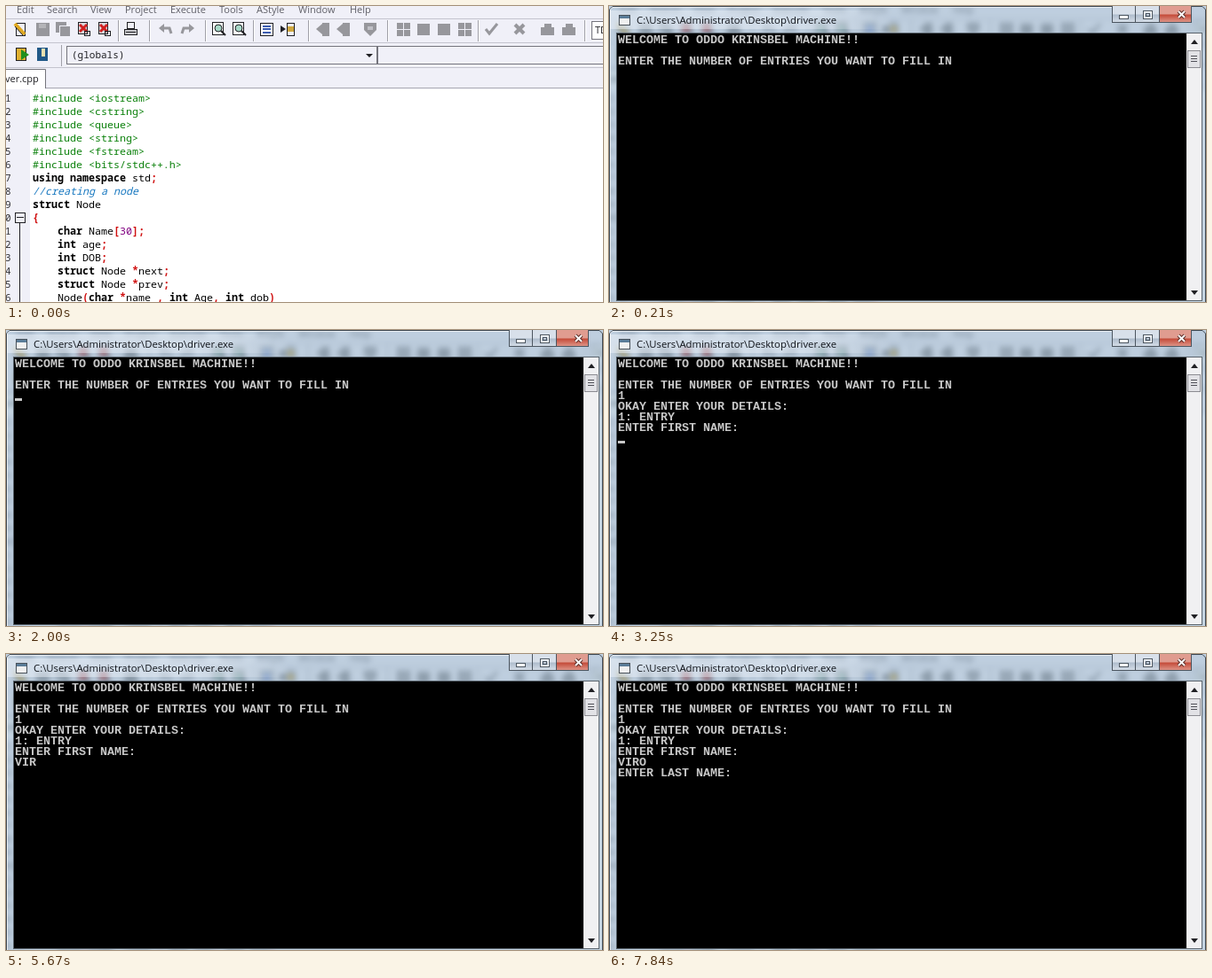
An HTML page with a canvas that plays this animation: 672 px wide and 334 px high, repeating every 8 s.

```html
<!DOCTYPE html>
<html lang="en">
<head>
<meta charset="utf-8">
<title>Console session</title>
<style>
html, body { margin: 0; width: 100%; height: 100%; overflow: hidden; }
canvas { display: block; }
</style>
</head>
<body>
<canvas id="stage" width="672" height="334"></canvas>
<script>
const W = 672, H = 334, LOOP = 8000;
const UI = '"Open Sans", sans-serif';
const CODE = '"Noto Sans Mono", monospace';
const MONO = '"Liberation Mono", monospace';
const INK = '#202024', GRAY = '#97979c', BAR = '#f0f0f8', PAPER = '#fff';
const EDGE = '#c4c4ce', BORDER = '#74747c', CONSOLE_INK = '#c8c8c8';

function makeLayer(paint) {
  const canvas = document.createElement('canvas');
  canvas.width = W;
  canvas.height = H;
  paint(canvas.getContext('2d'));
  return canvas;
}

function rect(c, color, x, y, w, h) {
  c.fillStyle = color;
  c.fillRect(x, y, w, h);
}

function frame(c, color, x, y, w, h) {
  c.strokeStyle = color;
  c.lineWidth = 1;
  c.strokeRect(x + .5, y + .5, w - 1, h - 1);
}

function line(c, color, width, ...points) {
  c.strokeStyle = color;
  c.lineWidth = width;
  c.beginPath();
  for (let i = 0; i < points.length; i += 2) c.lineTo(points[i], points[i + 1]);
  c.stroke();
}

function shape(c, color, ...points) {
  c.fillStyle = color;
  c.beginPath();
  for (let i = 0; i < points.length; i += 2) c.lineTo(points[i], points[i + 1]);
  c.fill();
}

function text(c, string, x, y, font, color) {
  c.font = font;
  c.fillStyle = color;
  c.fillText(string, x, y);
}

// Toolbar icons, each centred on x, y
const icons = {
  edit(c, x, y) {
    frame(c, INK, x - 5, y - 7, 11, 15);
    line(c, '#e0a820', 4, x - 6, y - 6, x + 5, y + 6);
    line(c, INK, 1, x - 6, y - 3, x + 3, y + 7);
  },
  save(c, x, y) {
    rect(c, GRAY, x - 7, y - 7, 15, 15);
    rect(c, '#b4b4b8', x - 4, y - 6, 8, 5);
  },
  saveAll(c, x, y) {
    rect(c, GRAY, x - 8, y - 8, 12, 12);
    rect(c, BAR, x - 4, y - 4, 12, 12);
    rect(c, GRAY, x - 3, y - 3, 11, 11);
  },
  close(c, x, y) {
    rect(c, '#d8d8dc', x - 6, y - 8, 11, 14);
    frame(c, INK, x - 6, y - 8, 11, 14);
    line(c, '#d02020', 3, x - 4, y - 5, x + 4, y + 3);
    line(c, '#d02020', 3, x + 4, y - 5, x - 4, y + 3);
    frame(c, INK, x + 1, y + 2, 7, 6);
  },
  print(c, x, y) {
    frame(c, INK, x - 4, y - 8, 9, 8);
    rect(c, '#c8c8cc', x - 7, y, 15, 7);
    frame(c, INK, x - 7, y, 15, 7);
    rect(c, INK, x - 5, y + 3, 11, 1);
  },
  undo(c, x, y, dir = 1) {
    shape(c, GRAY, x - 8 * dir, y - 1, x - 2 * dir, y - 6, x - 2 * dir, y + 4);
    line(c, GRAY, 3, x - 3 * dir, y - 1, x + 4 * dir, y - 1, x + 6 * dir, y + 5);
  },
  redo(c, x, y) { icons.undo(c, x, y, -1); },
  find(c, x, y) {
    rect(c, PAPER, x - 7, y - 8, 13, 15);
    frame(c, INK, x - 7, y - 8, 13, 15);
    c.fillStyle = '#a8d8c8';
    c.beginPath();
    c.arc(x, y - 1, 4, 0, 7);
    c.fill();
    c.stroke();
    line(c, INK, 2, x + 3, y + 2, x + 8, y + 7);
  },
  page(c, x, y) {
    rect(c, PAPER, x - 7, y - 7, 15, 15);
    frame(c, INK, x - 7, y - 7, 15, 15);
    for (const dy of [-4, -1, 3]) rect(c, '#3c5cb0', x - 4, y + dy, 9, 2);
  },
  jump(c, x, y) {
    frame(c, INK, x - 1, y - 7, 9, 15);
    rect(c, '#d0a840', x, y - 3, 7, 6);
    shape(c, INK, x - 8, y - 4, x - 2, y, x - 8, y + 4);
  },
  mark(c, x, y) {
    rect(c, GRAY, x - 1, y - 7, 8, 15);
    shape(c, GRAY, x - 8, y, x - 1, y - 6, x - 1, y + 6);
  },
  shield(c, x, y) {
    shape(c, GRAY, x - 7, y - 7, x + 7, y - 7, x + 7, y + 1, x, y + 8, x - 7, y + 1);
    rect(c, '#c0c0c6', x - 3, y - 3, 6, 4);
  },
  grid(c, x, y) {
    for (const dx of [-7, 1]) for (const dy of [-7, 1]) rect(c, GRAY, x + dx, y + dy, 7, 7);
  },
  block(c, x, y) {
    rect(c, GRAY, x - 7, y - 6, 14, 13);
  },
  check(c, x, y) { line(c, GRAY, 3, x - 6, y, x - 2, y + 5, x + 7, y - 6); },
  cross(c, x, y) {
    line(c, GRAY, 4, x - 5, y - 5, x + 5, y + 5);
    line(c, GRAY, 4, x + 5, y - 5, x - 5, y + 5);
  },
  chart(c, x, y) {
    rect(c, GRAY, x - 7, y - 2, 15, 9);
    rect(c, GRAY, x - 3, y - 6, 8, 6);
  }
};

const toolbar = [
  ['edit', 16], ['save', 41], ['saveAll', 64], ['close', 87], ['close', 110], ['print', 140],
  ['undo', 180], ['redo', 204], ['find', 239], ['find', 262], ['page', 293], ['jump', 317],
  ['mark', 357], ['mark', 380], ['shield', 410], ['grid', 447], ['block', 470],
  ['block', 493], ['grid', 516], ['check', 546], ['cross', 578], ['chart', 609], ['chart', 633]
];

const menu = { Edit: 12, Search: 46, View: 95, Project: 134, Execute: 185,
  Tools: 240, AStyle: 282, Window: 329, Help: 387 };

const code = `#include <iostream>
#include <cstring>
#include <queue>
#include <string>
#include <fstream>
#include <bits/stdc++.h>
using namespace std;
//creating a node
struct Node
{
    char Name[30];
    int age;
    int DOB;
    struct Node *next;
    struct Node *prev;
    Node(char *name , int Age, int dob)`.split('\n');

function drawCodeLine(c, source, y) {
  const size = '11.667px ' + CODE;
  if (source[0] === '#') return text(c, source, 30, y, size, '#0a800a');
  if (source[0] === '/') return text(c, source, 30, y, 'italic ' + size, '#1878c0');
  for (const token of source.matchAll(/\w+|[^\w\s]/g)) {
    const keyword = /^(using|namespace|struct|char|int)$/.test(token[0]);
    const symbol = /\W/.test(token[0]);
    const number = /^\d/.test(token[0]);
    text(c, token[0], 30 + 7 * token.index, y, (keyword || symbol ? 'bold ' : '') + size,
      symbol ? '#d01010' : number ? '#800080' : '#000');
  }
}

function drawCombo(c, x, w) {
  rect(c, BAR, x, 45, w, 21);
  frame(c, BORDER, x, 45, w, 21);
  shape(c, INK, x + w - 13, 54, x + w - 5, 54, x + w - 9, 58);
}

const editor = makeLayer(c => {
  rect(c, BAR, 0, 0, W, H);
  for (const name in menu) text(c, name, menu[name], 8, '11px ' + UI, '#606068');
  rect(c, EDGE, 0, 14, W, 1);
  rect(c, EDGE, 0, 41, W, 1);
  for (const x of [126, 161, 224, 278, 340, 429, 531, 651]) {
    rect(c, '#a0a0a8', x, 16, 1, 24);
    rect(c, PAPER, x + 1, 16, 1, 24);
  }
  for (const [name, x] of toolbar) icons[name](c, x, 26);
  rect(c, PAPER, 659, 17, 20, 21);
  frame(c, BORDER, 659, 17, 20, 21);
  text(c, 'TDM', 663, 31, '11px ' + UI, INK);

  rect(c, '#e0b030', 11, 47, 12, 15);
  frame(c, INK, 11, 47, 12, 15);
  shape(c, '#209020', 17, 49, 26, 55, 17, 61);
  rect(c, '#205888', 35, 47, 12, 15);
  rect(c, '#e8e0b0', 40, 48, 4, 9);
  rect(c, '#a0a0a8', 62, 44, 1, 24);
  drawCombo(c, 68, 350);
  drawCombo(c, 418, 300);
  text(c, '(globals)', 74, 59, '11px ' + CODE, INK);

  rect(c, EDGE, 0, 69, W, 1);
  rect(c, '#acacb4', 0, 92, W, 1);
  rect(c, PAPER, 0, 71, 44, 23);
  line(c, BORDER, 1, 0, 71.5, 44.5, 71.5, 44.5, 93);
  text(c, 'ver.cpp', -1, 86, '11px ' + UI, INK);

  rect(c, PAPER, 0, 94, W, 240);
  rect(c, BAR, 0, 94, 27, 240);
  code.forEach((source, i) => {
    const y = 108 + 15 * i;
    text(c, String((i + 1) % 10), -1, y, '11px ' + CODE, '#303034');
    drawCodeLine(c, source, y);
  });
  line(c, INK, 1, 15.5, 245, 15.5, H);
  frame(c, INK, 10, 233, 12, 12);
  rect(c, INK, 12, 238, 8, 1);
});

function drawTitleButton(c, x, w, top, bottom) {
  const fill = c.createLinearGradient(0, 0, 0, 19);
  fill.addColorStop(0, top);
  fill.addColorStop(.48, top);
  fill.addColorStop(.52, bottom);
  fill.addColorStop(1, top);
  rect(c, fill, x, 0, w, 19);
  frame(c, '#4c5660', x, -1, w, 20);
}

const consoleWindow = makeLayer(c => {
  // Glass: the blurred editor under a cool tint
  rect(c, BAR, 0, 0, W, H);
  c.filter = 'blur(3px)';
  c.drawImage(editor, 0, 0);
  c.filter = 'none';
  rect(c, 'rgba(130,165,190,.45)', 0, 0, W, H);
  const glow = c.createLinearGradient(0, 0, 320, 0);
  glow.addColorStop(0, 'rgba(245,249,255,.45)');
  glow.addColorStop(.75, 'rgba(245,249,255,.35)');
  glow.addColorStop(1, 'rgba(245,249,255,0)');
  rect(c, glow, 0, 5, 320, 21);

  line(c, '#3c4650', 1, .5, H, .5, 4, 4, .5, W - 4, .5, W - .5, 4, W - .5, H);
  line(c, 'rgba(255,255,255,.7)', 1, 1.5, H, 1.5, 4, 4, 1.5, 566, 1.5);

  rect(c, '#f0f0f0', 11, 10, 13, 12);
  frame(c, '#4a525a', 11, 10, 13, 12);
  rect(c, '#5a7c98', 12, 11, 11, 3);
  text(c, 'C:\\Users\\Administrator\\Desktop\\driver.exe', 31, 20, '11.3px ' + UI, '#10141a');

  drawTitleButton(c, 566, 27, '#d8e0ea', '#aebccc');
  drawTitleButton(c, 592, 28, '#d8e0ea', '#aebccc');
  drawTitleButton(c, 619, 37, '#e09c90', '#c44a38');
  rect(c, '#fff', 574, 11, 11, 3);
  frame(c, '#4c5660', 574, 10, 11, 5);
  frame(c, '#4c5660', 601, 5, 11, 10);
  frame(c, '#fff', 602, 6, 9, 8);
  frame(c, '#4c5660', 604, 8, 5, 4);
  for (const [color, width] of [['#60302a', 4], ['#fff', 2]]) {
    line(c, color, width, 641, 6, 648, 13);
    line(c, color, width, 648, 6, 641, 13);
  }

  frame(c, '#59636c', 8, 30, 660, 303);
  rect(c, '#000', 9, 31, 641, 301);
  rect(c, '#f0f0f2', 650, 31, 17, 301);
  shape(c, INK, 655, 43, 659, 38, 663, 43);
  shape(c, INK, 655, 321, 663, 321, 659, 326);
  rect(c, '#e2e2e6', 651, 50, 15, 20);
  frame(c, '#8c8c92', 651, 50, 15, 20);
  for (const y of [56, 59, 62]) rect(c, '#505058', 655, y, 7, 1);
});

const stage = document.getElementById('stage').getContext('2d');
const screen = makeLayer(() => {});
const intro = ['WELCOME TO ODDO KRINSBEL MACHINE!!', '',
  'ENTER THE NUMBER OF ENTRIES YOU WANT TO FILL IN'];
const typed = (t, word, times) => word.slice(0, times.filter(at => t >= at).length);

function consoleLines(t) {
  const lines = [...intro, typed(t, '1', [2330])];
  if (t >= 2670) {
    lines.push('OKAY ENTER YOUR DETAILS:', '1: ENTRY', 'ENTER FIRST NAME:',
      typed(t, 'VIRO', [4540, 5170, 5670, 6000]));
  }
  if (t >= 6170) lines.push('ENTER LAST NAME:', '');
  return lines;
}

function drawConsole(c, t) {
  c.drawImage(consoleWindow, 0, 0);
  const lines = consoleLines(t);
  lines.forEach((string, row) =>
    text(c, string, 10, 42 + 12 * row, 'bold 13.333px ' + MONO, CONSOLE_INK));
  if (t >= 1000 && t % 1000 < 500) {
    const row = lines.length - 1;
    rect(c, CONSOLE_INK, 10 + 8 * lines[row].length, 41 + 12 * row, 8, 3);
  }
}

function draw(now) {
  const t = now % LOOP;
  stage.globalAlpha = 1;
  stage.drawImage(editor, 0, 0);
  if (t >= 170) {
    // The opening window is half transparent as a whole
    drawConsole(screen.getContext('2d'), t);
    stage.globalAlpha = t < 210 ? .5 : 1;
    stage.drawImage(screen, 0, 0);
  }
  requestAnimationFrame(draw);
}
requestAnimationFrame(draw);
</script>
</body>
</html>
```
